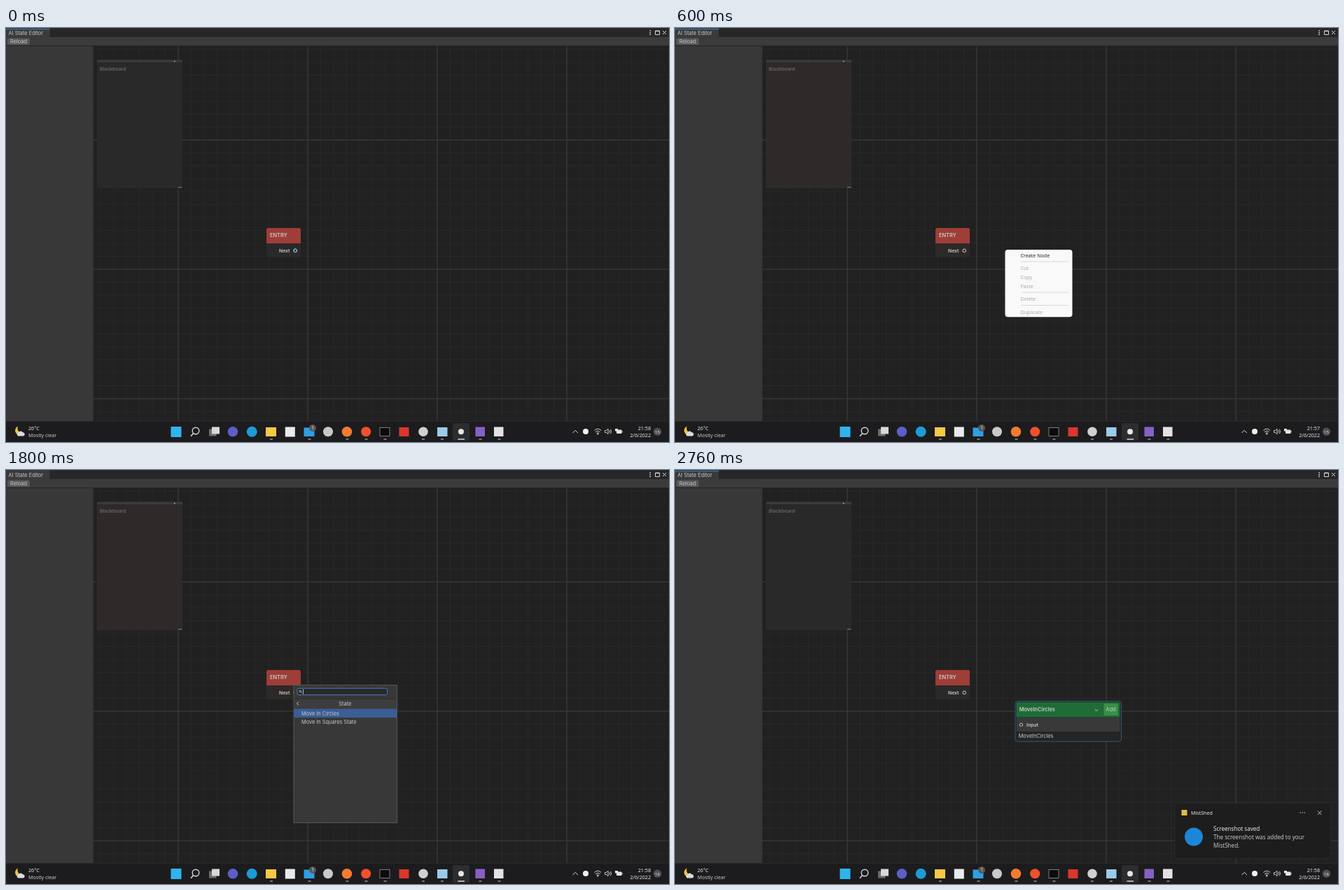
Recreate the animation shown at these times as an HTML page. Size 947 by 592 pixels, loop 3 s.

```html
<!DOCTYPE html>
<html lang="en">
<head>
<meta charset="utf-8">
<title>AI State Editor</title>
<style>
  html, body { margin: 0; width: 100%; height: 100%; overflow: hidden; background: #212121; }
  svg { display: block; width: 100vw; height: 100vh; }
  text { font: 7.4px Inter, sans-serif; fill: #c8c8c8; white-space: pre; }
  .bold { font-weight: 600; }
  .small { font-size: 6.8px; }
  .sys text, text.sys { font: 7.15px "Open Sans", sans-serif; fill: #f4f4f4; }
  .menu text { fill: #a2a2a2; }
  .toast .body { font-size: 8.15px; }
  .end { text-anchor: end; }
  .mid { text-anchor: middle; }
  .line { fill: none; stroke: #d6d6d6; stroke-width: 1; }

  /* Each step lasts 600 ms; --at is the first step in which a part shows. */
  .one, .two, .three { animation: one 3s step-end calc((var(--at) - 5) * 600ms) infinite; }
  .two { animation-name: two; }
  .three { animation-name: three; }
  @keyframes one { 0% { visibility: visible } 20%, 100% { visibility: hidden } }
  @keyframes two { 0% { visibility: visible } 40%, 100% { visibility: hidden } }
  @keyframes three { 0% { visibility: visible } 60%, 100% { visibility: hidden } }
</style>
</head>
<body>
<svg viewBox="0 0 947 592" preserveAspectRatio="none">
  <defs>
    <pattern id="minor" x="245.5" y="159.5" width="18.5" height="18.5" patternUnits="userSpaceOnUse">
      <path d="M0 .5H18.5M.5 0V18.5" stroke="#282828" fill="none"/>
    </pattern>
    <pattern id="major" x="245.5" y="159.5" width="185" height="185" patternUnits="userSpaceOnUse">
      <path d="M0 .5H185M.5 0V185" stroke="#3b3b3b" fill="none"/>
    </pattern>
  </defs>

  <!-- Graph canvas -->
  <rect width="947" height="592" fill="#212121"/>
  <rect x="124" y="26" width="823" height="536" fill="url(#minor)"/>
  <rect x="124" y="26" width="823" height="536" fill="url(#major)"/>

  <!-- Window frame -->
  <rect width="947" height="13" fill="#272727"/>
  <rect width="62.5" height="13" fill="#3a3a3a"/>
  <g class="three" style="--at:4"><rect y="1" width="62.5" height="1.3" fill="#2f6ea5"/></g>
  <rect y="13" width="947" height="12" fill="#3b3b3b"/>
  <rect y="25" width="947" height="1" fill="#272727"/>
  <rect x="2" y="14.5" width="32" height="9.5" rx="1.5" fill="#575757"/>
  <text x="3.5" y="10.3">AI State Editor</text>
  <text x="6" y="22">Reload</text>
  <path d="M919.3 3h1.6v1.6h-1.6zM919.3 5.8h1.6v1.6h-1.6zM919.3 8.6h1.6v1.6h-1.6z" fill="#c8c8c8"/>
  <path class="line" d="M927.5 4h6v5.5h-6zM927.5 4.6h6M938 4l5 5M943 4l-5 5"/>
  <rect y="26" width="123.5" height="536" fill="#383838"/>
  <rect x="123.5" y="26" width="1" height="536" fill="#414141"/>

  <!-- Blackboard -->
  <rect x="130" y="46" width="122" height="183" rx="1" fill="#292929"/>
  <rect class="three" style="--at:1" x="130" y="46" width="122" height="183" rx="1" fill="#2f2a2a"/>
  <rect x="130" y="45.5" width="122" height="3.5" rx="1" fill="#3a3a3a"/>
  <rect x="240" y="47" width="1.6" height="1.4" fill="#b5b5b5"/>
  <rect x="246" y="227.3" width="5.5" height="1" fill="#858585"/>
  <text class="bold small" x="134" y="60.7" style="fill:#676767">Blackboard</text>

  <!-- Entry node -->
  <rect x="372" y="286" width="49" height="42" rx="2.5" fill="#292929"/>
  <rect class="three" style="--at:1" x="372" y="300" width="49" height="28" rx="2.5" fill="#2d2929"/>
  <path d="M372 308V288.5q0-2.5 2.5-2.5h44q2.500 0 2.500 2.500V308z" fill="#9f3d37"/>
  <text class="bold" x="377" y="299.2">ENTRY</text>
  <text class="bold small" x="390" y="320.8">Next</text>
  <circle class="line" cx="413.2" cy="318.3" r="2.3"/>
  <circle class="line one" style="--at:0;stroke:#77cdd2" cx="413.2" cy="318.3" r="2.3"/>

  <!-- Context menu -->
  <g class="menu sys one" style="--at:1">
    <rect x="471.5" y="317" width="96" height="96.300" rx="4" fill="#f9f9f9"/>
    <path d="M495 334H562M495 378H562M495 396.500H562" stroke="#d8d8d8"/>
    <text x="493.5" y="328" style="fill:#1c1c1c">Create Node</text>
    <text x="493.5" y="346.300">Cut</text>
    <text x="493.5" y="359.300">Copy</text>
    <text x="493.5" y="372">Paste</text>
    <text x="493.5" y="390.300">Delete</text>
    <text x="493.5" y="408.500">Duplicate</text>
  </g>

  <!-- Search window -->
  <g class="two" style="--at:2">
    <rect x="411" y="307.5" width="147.500" height="197" fill="#383838" stroke="#565656"/>
    <rect x="411.500" y="327" width="146.500" height="14.500" fill="#3d3d3d"/>
    <path d="M411.500 327H558" stroke="#2b2b2b"/>
    <rect x="416" y="312.200" width="128.500" height="9.300" rx="2" fill="#292929" stroke="#3d7dbd"/>
    <circle class="line" cx="420.300" cy="316.400" r="1.300" style="stroke-width:.8"/>
    <path class="line" d="M421.300 317.400l1.700 1.700M424.500 313.500v7" style="stroke-width:.8"/>
    <rect x="411.500" y="341.500" width="146.500" height="12.500" fill="#3b5e95"/>
  </g>
  <g class="one" style="--at:2">
    <text class="mid" x="484.300" y="337">Create</text>
    <text x="422" y="350.500">State</text>
    <text x="422" y="362.700">Condition</text>
    <text x="422" y="375">Reference</text>
    <path class="line" d="M552.500 345.500l2.500 2.500l-2.500 2.500M552.500 357.500l2.500 2.500l-2.500 2.500" style="stroke-width:.9"/>
  </g>
  <g class="one" style="--at:3">
    <text class="mid" x="484.300" y="337">State</text>
    <text x="422" y="350.500">Move In Circles</text>
    <text x="422" y="362.700">Move In Squares State</text>
    <path class="line" d="M418 331.500l-2.500 2.500l2.500 2.500" style="stroke-width:.9"/>
  </g>

  <!-- New node and notification -->
  <g class="one" style="--at:4">
    <rect x="486" y="330.500" width="151.500" height="57.700" rx="3.500" fill="#252525" stroke="#2f597b"/>
    <path d="M487.500 353.500V334q0-2 2-2h144q2 0 2 2v19.500z" fill="#1f6c36"/>
    <rect x="487.500" y="354" width="148" height="20" fill="#393939"/>
    <rect x="612.500" y="334" width="20.500" height="17" rx="1.500" fill="#389047"/>
    <text class="bold" x="491.700" y="345.200">MoveInCircles</text>
    <text class="mid" x="622.700" y="345">Add</text>
    <path class="line" d="M599.700 342.300l2.300 2.300l2.300-2.300" style="stroke-width:.9"/>
    <circle class="line" cx="494.500" cy="364.300" r="2.200" style="stroke:#a7cfd0"/>
    <text class="bold small" x="502" y="366.800">Input</text>
    <text x="490.700" y="383.300">MoveInCircles</text>
  </g>
  <g class="toast sys one" style="--at:4">
    <rect x="714" y="476.500" width="222.500" height="79" rx="5" fill="#1d1d1d" stroke="#292929"/>
    <rect x="723.500" y="486" width="8" height="8" fill="#e5b94d"/>
    <text x="737" y="492.500">MistShed</text>
    <path d="M892.500 490h1.500m1.500 0h1.500m1.500 0h1.500" stroke="#ccc"/>
    <path class="line" d="M918 487.500l5.500 5.500M923.500 487.500l-5.500 5.500" style="stroke-width:.9"/>
    <circle cx="741" cy="524.500" r="13" fill="#1d86d8"/>
    <text class="body" x="769" y="516.300">Screenshot saved</text>
    <text class="body" x="769" y="528" style="fill:#d0d0d0">The screenshot was added to your</text>
    <text class="body" x="769" y="539.500" style="fill:#d0d0d0">MistShed.</text>
  </g>

  <!-- Taskbar -->
  <rect y="562" width="947" height="30" fill="#1c1c1e"/>
  <path d="M0 562.500H947" stroke="#29292b"/>
  <path d="M17 569.500a6.500 6.500 0 1 0 8 9.500a7 7 0 0 1-8-9.500z" fill="#f6c440"/>
  <path d="M17.500 583.500a2.400 2.400 0 0 1 .3-4.700a3.300 3.300 0 0 1 6-.6a2.700 2.700 0 0 1 .9 5.300z" fill="#d9dde3"/>
  <g class="sys">
    <text x="32" y="575.200">26°C</text>
    <text x="32" y="585.200" style="fill:#d5d5d5">Mostly clear</text>
  </g>

  <rect x="638" y="565" width="24" height="25" rx="2.500" fill="#2d2d2f"/>
  <rect x="235.500" y="570" width="15" height="15" fill="#30b4ee"/>
  <circle class="line" cx="271" cy="576" r="4.800" style="stroke-width:1.400"/>
  <path class="line" d="M267.500 579.800l-3.500 4" style="stroke-width:1.600"/>
  <rect x="290" y="573.500" width="10.500" height="10" fill="#6c6c6c"/>
  <rect x="294" y="570.500" width="11" height="10" fill="#d8d8d8"/>
  <circle cx="324" cy="577.300" r="7.300" fill="#5b5fc7"/>
  <circle cx="351.200" cy="577.300" r="7.500" fill="#1d9bd3"/>
  <rect x="371" y="571" width="15" height="13" fill="#f7c846"/>
  <rect x="398.800" y="570.500" width="14" height="14" fill="#e8eaec"/>
  <rect x="425.500" y="571.500" width="15" height="12.500" fill="#2f9fe3"/>
  <circle cx="438" cy="572" r="5" fill="#595959"/>
  <text class="sys mid" x="438" y="574.400" style="font-size:6.500px">1</text>
  <circle cx="460" cy="577.300" r="7" fill="#c9c9c9"/>
  <circle cx="487" cy="577.300" r="7.300" fill="#f47b32"/>
  <circle cx="514.200" cy="577.300" r="7" fill="#f0502c"/>
  <rect x="534" y="571.500" width="14" height="12" fill="#0b0b0b" stroke="#969696" stroke-width=".8"/>
  <rect x="561.500" y="571" width="14" height="13" fill="#d9372c"/>
  <circle cx="596" cy="577.300" r="6.800" fill="#d0d0d0"/>
  <rect x="616" y="571" width="14.500" height="13" fill="#9ccbe8"/>
  <circle cx="650" cy="577.300" r="4" fill="#e6e6e6"/>
  <rect x="670.500" y="570.500" width="13.500" height="13.500" fill="#8661c5"/>
  <rect x="697" y="570.500" width="13.500" height="13.500" fill="#e4e0e4"/>
  <path d="M377 588h4M431.500 588h4M485.500 588h4M512.500 588h4M539.500 588h4M594 588h4M621 588h4M675.500 588h4M702.500 588h4" stroke="#929292" stroke-width="1.600"/>
  <path d="M645.500 588h9.500" stroke="#c4c4c4" stroke-width="1.700"/>

  <!-- System tray -->
  <path class="line" d="M809.500 579l3.700-3.700l3.700 3.700"/>
  <circle cx="828" cy="577" r="4" fill="#efefef"/>
  <path class="line" d="M840.500 575.500q4.800-4.600 9.600 0M842.200 577.600q3.100-2.900 6.200 0M843.700 579.500q1.600-1.500 3.200 0"/>
  <circle cx="845.300" cy="580.500" r="1" fill="#e6e6e6"/>
  <path class="line" d="M855.500 575.500h2l2.500-2.300v7.600l-2.500-2.300h-2zM861.800 575.200q1.300 1.800 0 3.600M863.400 573.800q2.400 3.200 0 6.400" style="stroke-width:.9"/>
  <rect x="872" y="574.500" width="7.500" height="5.500" rx="1" fill="#e6e6e6"/>
  <path d="M879.500 576h1v2.500h-1zM870 573h4v3.500h-4z" fill="#e6e6e6"/>
  <g class="sys end">
    <text class="three" style="--at:2" x="921" y="574.500">21:58</text>
    <text class="one" style="--at:0" x="921" y="574.500">21:58</text>
    <text class="one" style="--at:1" x="921" y="574.500">21:57</text>
    <text x="921" y="584.700">2/6/2022</text>
  </g>
  <circle cx="930.500" cy="577.300" r="5.700" fill="#515153"/>
  <g class="sys mid">
    <text class="two" style="--at:0;font-size:6px" x="930.500" y="579.500">15</text>
    <text class="three" style="--at:2;font-size:6px" x="930.500" y="579.500">16</text>
  </g>
</svg>
</body>
</html>
```
